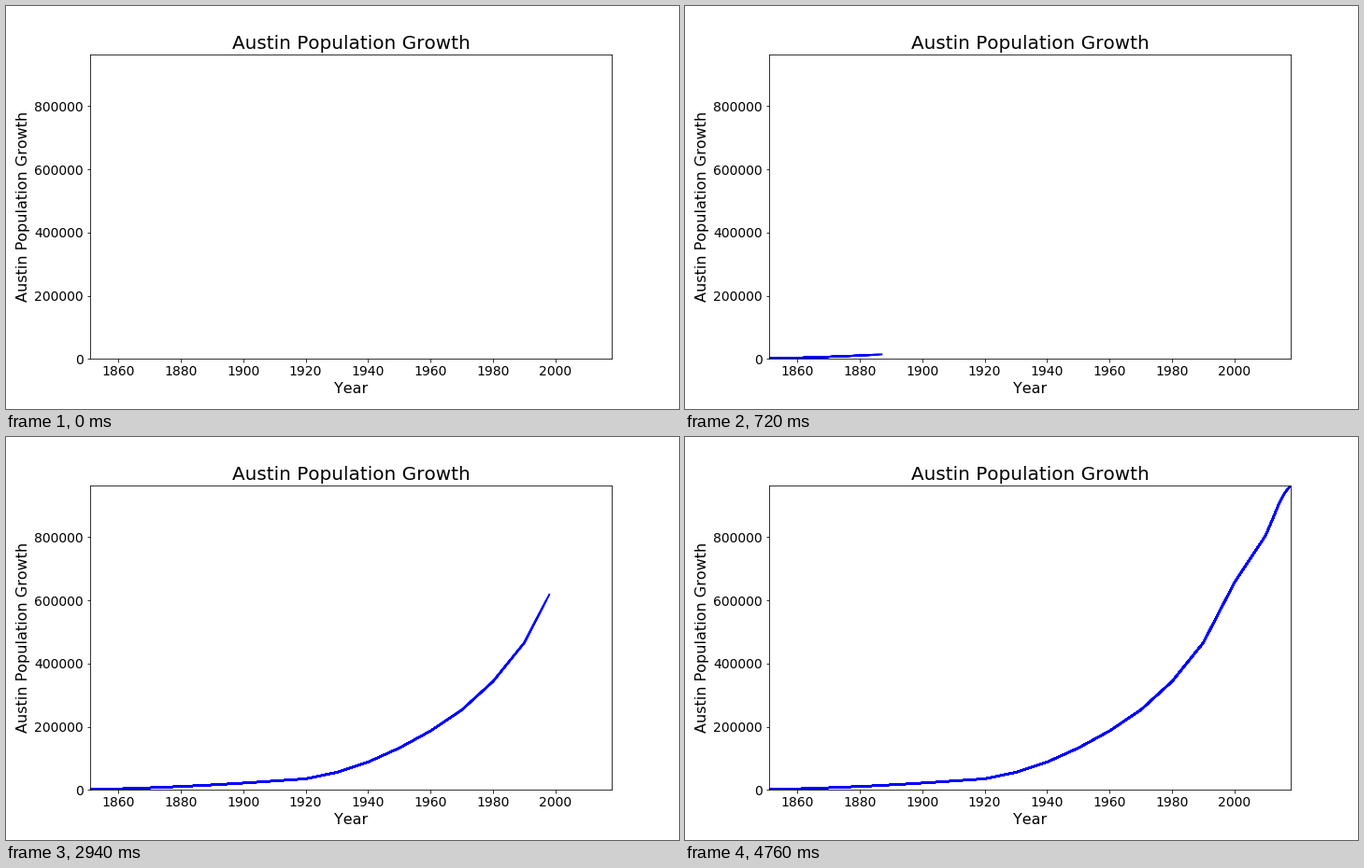
These frames come from a looping animation (720x432 px, 4.8 s). A matplotlib script:

```python
import numpy as np
import matplotlib.pyplot as plt
from matplotlib.animation import FuncAnimation

FRAMES = 240
STEPS = 10      # interpolated rows between two data points
DEPTH = 100     # overlaid strokes kept, they thicken the older part
TITLE = "Austin Population Growth"

plt.rcParams["font.family"] = "DejaVu Sans"
plt.rcParams["text.kerning_factor"] = 6


def population(year):
    """Slow quadratic start, then constant growth rates between key years."""
    t = (year - 1850) / 10
    early = 629 + 2000 * t + 430 * t**2
    key_years = [1920, 1940, 1950, 1960, 1990, 2000, 2010, 2014, 2016, 2018]
    thousands = [34.9, 87.9, 132.5, 186.5, 465.6, 656.6, 806.2, 901.2,
                 939.4, 964.3]
    late = 1000 * np.exp(np.interp(year, key_years, np.log(thousands)))
    return np.where(year < 1920, early, late)


# One data point per decade, then one per year
years = np.r_[np.arange(1850, 2010, 10), np.arange(2010, 2019)]
people = population(years)

index = np.arange(len(years))
rows = np.arange((len(years) - 1) * STEPS) / STEPS
x = np.interp(rows, index, years)
y = np.interp(rows, index, people)

fig = plt.figure(figsize=(10, 6), dpi=72)
fig.subplots_adjust(left=0.125, right=0.9, bottom=0.125, top=0.88)
ax = fig.add_subplot()
ax.set_xlim(1851, 2018)
ax.set_ylim(people[0], people[-1])
ax.set_xticks(range(1860, 2001, 20))
# The lowest tick sits on the axis edge, a fraction of a pixel above zero
marks = range(0, 800001, 200000)
ax.set_yticks([max(m, people[0]) for m in marks], labels=map(str, marks))
ax.tick_params(labelsize=14)
ax.set_xlabel("Year", fontsize=16)
ax.set_ylabel(TITLE, fontsize=16)
ax.set_title(TITLE, fontsize=20)

# One stroke per step, each a row longer than the last
strokes = [ax.plot(x[:n], y[:n], color="b", lw=2)[0]
           for n in range(2, len(x) + 1)]


def update(k):
    # Short dark flash right after the start
    paper = "#262626" if k == 1 else "white"
    fig.set_facecolor(paper)
    ax.set_facecolor(paper)
    last = min(k, len(strokes) - 1)
    for j, stroke in enumerate(strokes):
        stroke.set_visible(k > 1 and last - DEPTH < j <= last)
    return strokes


anim = FuncAnimation(fig, update, frames=FRAMES, interval=20, repeat=True)
plt.show()
```
